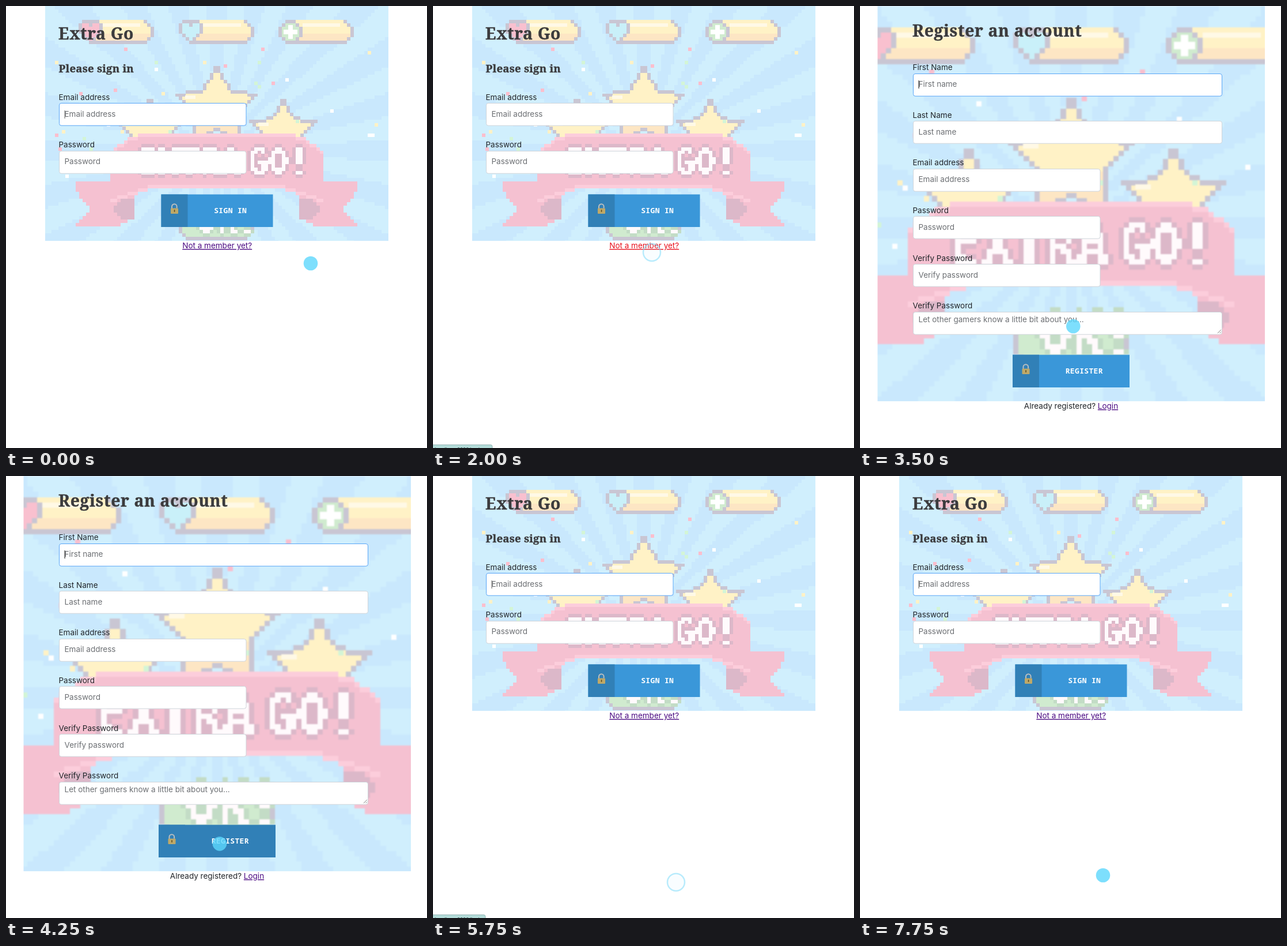
Write an HTML page that moves like this. It is 731 px wide and 766 px high and loops after 8000 ms.

```html
<!DOCTYPE html>
<html lang="en">
<head>
<meta charset="utf-8">
<title>Sign in and register</title>
<style>
  html, body { margin: 0; width: 100%; height: 100%; overflow: hidden; background: #fff; }
  #stage { display: block; width: 100vw; height: 100vh; }
  text { font: 13.5px Inter, "Open Sans", sans-serif; fill: #212529; }
  .title, .sub { font: 700 28.3px "Noto Serif", serif; letter-spacing: .65px; fill: #3b3b3d; stroke: #3b3b3d; stroke-width: .4; }
  .sub { font-size: 18.7px; letter-spacing: .2px; }
  .hint { fill: #6c6f73; }
  .link { fill: #4b0a82; text-decoration: underline; }
  .action { font: 700 13px "Noto Sans Mono", monospace; letter-spacing: .35px; fill: #fff; }
  .status { font: 9px Roboto, sans-serif; fill: #2d4a4a; }
  .art { shape-rendering: crispEdges; }
  .soft { filter: blur(.13px); }
</style>
</head>
<body>
<svg id="stage" viewBox="0 0 731 766">
  <defs><g id="art" class="art"></g></defs>
  <g id="signin"></g>
  <g id="register"></g>
  <g id="status">
    <rect x="-5" y="760.5" width="108" height="12" rx="3" fill="#b4dcd9" stroke="#93b5b4"/>
    <text class="status" x="3" y="772"></text>
  </g>
  <circle id="ring" r="15" fill="#7fdcfa" fill-opacity=".08" stroke="#7fdcfa" stroke-width="2.5"/>
  <circle id="dot" r="12.3" fill="#5cd7fc" opacity=".8"/>
</svg>
<script>
const $ = id => document.getElementById(id);

function add(parent, tag, attrs, text) {
  const el = document.createElementNS('http://www.w3.org/2000/svg', tag);
  for (const k in attrs) el.setAttribute(k, attrs[k]);
  if (text) el.textContent = text;
  parent.appendChild(el);
  return el;
}
const box = (p, x, y, width, height, fill, more) => add(p, 'rect', { x, y, width, height, fill, ...more });

// ---- pixel art: 100 x 75 cells, x = 0 in the middle ----
const W = 100, H = 75;
const GREY = '#c9c6d3', YELLOW = '#fff2c6', PEACH = '#fde6c4', CREAM = '#fff9e6',
      PINK = '#f5c1d1', ROSE = '#fccddb', SHADE = '#dcb8c9', GREEN = '#d0ebcf', WHITE = '#fffafc';
const art = $('art');
const { abs, cos, sin, min, max, floor, hypot, PI } = Math;

// Fills every cell whose middle passes the test, in row runs.
function fill(parent, color, test) {
  let d = '';
  for (let y = 0; y < H; y++) {
    for (let x = -W / 2; x < W / 2; x++) {
      const from = x;
      while (x < W / 2 && test(x + .5, y + .5)) x++;
      if (x > from) d += `M${from} ${y}h${x - from}v1h${from - x}z`;
    }
  }
  add(parent, 'path', { d, fill: color });
}
const core = test => (x, y) => test(x, y) &&
  test(x - 1, y) && test(x + 1, y) && test(x, y - 1) && test(x, y + 1);
const at = (x, y) => add(art, 'g', { transform: `translate(${x} ${y})` });

function outlined(parent, test, color) {
  fill(parent, GREY, test);
  fill(parent, color, core(test));
}

function rays() {
  box(art, -W / 2, 0, W, H, '#d0effd');
  fill(art, '#c9e8fd', (x, y) => cos(24 * Math.atan2(x, y - 42)) > 0);
}

const heart = (x, y) => {
  const side = abs(x - 3.5);
  return side < min(3.6, 7.2 - y) && y > max(0, abs(side - 1.75) - .6);
};
const disc = (x, y) => hypot(x - 3.5, y - 3.5) < 3.4;

function bar(x, icon, color) {
  const g = at(x, 4);
  const tube = (a, b) => b < 7 && a > 3 && a < 22 - max(0, abs(b - 3.5) - 1);
  outlined(g, tube, PEACH);
  fill(g, YELLOW, (a, b) => b < 4 && core(tube)(a, b));
  box(g, 7, 1, 11, 1, CREAM);
  outlined(g, icon, color);
  return g;
}

function star(x, y, R) {
  const g = at(x, y);
  // Angle from the nearest tip, then the straight edge from tip to notch.
  const test = (a, b) => {
    const dy = R - b, turn = 2 * PI / 5;
    const ang = Math.atan2(a, dy), off = abs(ang - turn * Math.round(ang / turn));
    const notch = .54 * R, nx = notch * cos(PI / 5), ny = notch * sin(PI / 5);
    const r = hypot(a, dy);
    return r * cos(off) + r * sin(off) * (R - nx) / ny < R + .8;
  };
  outlined(g, test, YELLOW);
  fill(g, PEACH, (a, b) => b > 1.15 * R && core(test)(a, b));
  box(g, -.75 * R, .7 * R, 3, 1, CREAM);
}

function seeded(seed) {
  return () => (seed = seed * 16807 % 2147483647) / 2147483647;
}
function confetti() {
  const rnd = seeded(77), colors = [YELLOW, '#fbbecd', '#fff', '#d3f5d6'];
  for (let i = 0; i < 44; i++)
    box(art, floor(rnd() * 94) - 47, 12 + floor(rnd() * 38), 1, 1, colors[i % colors.length]);
}

// The ribbon is symmetric, so it is described by the distance from the middle.
function banner() {
  const main = (x, y) => {
    const a = abs(x);
    return a < 31.2 && y > 37 + 5 * max(0, (a - 19) / 12) ** 2 && y < 53 + .33 * max(0, a - 18);
  };
  const tail = (x, y) => {
    const a = abs(x);
    return a > 24 && a < min(41.5, 36.5 + .9 * abs(y - 58.9)) &&
      y > 51.2 && y < 64.5 - .5 * max(0, 30 - a);
  };
  const fold = (x, y) => abs(x) > 24 && abs(y - 58.7) < min(2.9, .9 * (30.7 - abs(x)));
  fill(art, PINK, tail);
  fill(art, ROSE, main);
  fill(art, PINK, (x, y) => main(x, y) && main(x, y - 1) && main(x, y + 1));
  fill(art, SHADE, fold);
}

// Sets a word in a small canvas and turns its dark spots into cells.
function word(str, x, base, shade) {
  const c = document.createElement('canvas');
  c.width = W;
  c.height = H;
  const pen = c.getContext('2d');
  pen.font = 'bold 10px "DejaVu Sans Mono", monospace';
  pen.fillText(str, x + W / 2, base);
  const px = pen.getImageData(0, 0, W, H).data;
  const lit = (a, b) => px[(floor(b) * W + floor(a) + W / 2) * 4 + 3] > 120;
  const near = (a, b) => lit(a, b) || lit(a - 1, b) || lit(a + 1, b) || lit(a, b - 1) || lit(a, b + 1);
  fill(art, shade, near);
  fill(art, WHITE, lit);
}

function okButton() {
  outlined(art, (x, y) => abs(x) < 11 - max(0, abs(y - 63) - 3) && abs(y - 63) < 4.6, GREEN);
  word('OK!', -6, 66, '#c3dcc6');
}

function drawArt() {
  rays();
  bar(-40.2, heart, '#f9c0cf');
  bar(-11, heart, '#c9f0f9');
  const health = bar(18, disc, GREEN);
  box(health, 1.5, 2.8, 4, 1.4, '#fff');
  box(health, 2.8, 1.5, 1.4, 4, '#fff');
  for (const side of [-1, 1]) star(19.4 * side, 27, 9.7);
  star(0, 17.4, 12.2);
  confetti();
  banner();
  word('EXTRA', -23, 49, SHADE);
  word('GO!', 9, 49, SHADE);
  okButton();
}

// ---- pages ----
function backdrop(p, x, width, height, cell) {
  const w = width / cell;
  const s = add(p, 'svg', { x, y: 0, width, height, viewBox: `${-w / 2} 0 ${w} ${height / cell}` });
  add(s, 'use', { href: '#art', class: 'soft' });
}

const WIDE = 536, NARROW = 324.5;
function field(p, y, width, label, hint = label, hintY = y + 23.5) {
  add(p, 'text', { x: 91.5, y: y - 5.5 }, label);
  const frame = box(p, 92.5, Math.round(y) + .5, width, 38.7, '#fff', { rx: 3.5, stroke: '#ced4da' });
  add(p, 'text', { x: 101.5, y: hintY, class: 'hint' }, hint);
  return frame;
}
const focus = (frame, on) => frame.setAttribute('stroke', on ? '#58a6f7' : '#ced4da');

function button(p, x, y, width, label) {
  const face = box(p, x, y, width, 56.5, '#3a97d9');
  box(p, x, y, 46, 56.5, '#3180b7');
  add(p, 'path', { d: `M${x + 18.5} ${y + 26}v-5a4.3 4.3 0 0 1 8.6 0v3`, fill: 'none', stroke: '#b9bec0', 'stroke-width': 2 });
  box(p, x + 16.5, y + 24, 13, 9.5, '#bfa968', { rx: 1 });
  box(p, x + 22.3, y + 26.5, 1.5, 4, '#5f4c1f');
  add(p, 'text', { x: x + 91.7, y: y + 32.5, class: 'action' }, label);
  return face;
}

drawArt();

const signin = $('signin'), register = $('register');
backdrop(signin, 67.5, 596.5, 407, 5.965);
add(signin, 'text', { x: 91, y: 58, class: 'title' }, 'Extra Go');
add(signin, 'text', { x: 91.5, y: 115, class: 'sub' }, 'Please sign in');
const email = field(signin, 168.2, NARROW, 'Email address');
field(signin, 250.8, NARROW, 'Password');
const emailCaret = box(signin, 101.5, 181, 1.2, 14, '#777');
button(signin, 269.5, 326.5, 194, 'SIGN IN');
const joinLink = add(signin, 'text', { x: 366.7, y: 420, 'text-anchor': 'middle', class: 'link' }, 'Not a member yet?');

backdrop(register, 30.5, 672.5, 685, 9.15);
add(register, 'text', { x: 91, y: 53, class: 'title' }, 'Register an account');
const rowY = i => 116.6 + 82.6 * i;
const firstName = field(register, rowY(0), WIDE, 'First Name', 'First name');
focus(firstName, true);
field(register, rowY(1), WIDE, 'Last Name', 'Last name');
field(register, rowY(2), NARROW, 'Email address');
field(register, rowY(3), NARROW, 'Password');
field(register, rowY(4), NARROW, 'Verify Password', 'Verify password');
field(register, rowY(5), WIDE, 'Verify Password', 'Let other gamers know a little bit about you...', 547.5);
add(register, 'path', { d: 'M621 567l6-6m-2.5 6l2.5-2.5', stroke: '#777', 'stroke-width': .9 });
const nameCaret = box(register, 101.5, 129, 1.2, 14, '#333');
const registerFace = button(register, 265, 604.5, 203, 'REGISTER');
const footer = add(register, 'text', { x: 366.5, y: 698, 'text-anchor': 'middle' }, 'Already registered? ');
add(footer, 'tspan', { class: 'link' }, 'Login');

// ---- timeline ----
const LOOP = 8000, STEP = 250, JOIN = 2000, OPEN = 2250, BACK = 5750;
const TRAVEL = 1250;
const start = { x: 529, y: 446 };
const moves = [
  { from: 250, x: 380, y: 415 },
  { from: 2750, x: 365, y: 631 },
  { from: 4000, x: 422, y: 692 }
];

const ease = p => p * p * (3 - 2 * p);
function pointer(t) {
  let { x, y } = start;
  for (const m of moves) {
    const e = ease(min(1, max(0, (t - m.from) / TRAVEL)));
    x += (m.x - x) * e;
    y += (m.y - y) * e;
  }
  return [x, y];
}
const show = (el, on) => el.setAttribute('visibility', on ? 'inherit' : 'hidden');
const within = (t, a, b) => t >= a && t < b;
const blink = since => floor(since / 500) % 2 === 0;

function render(time) {
  const t = floor(time % LOOP / STEP) * STEP;
  const second = within(t, OPEN, BACK), pressed = t === JOIN;
  show(signin, !second);
  show(register, second);

  focus(email, !pressed);
  show(emailCaret, !second && !pressed && blink(t < OPEN ? t : t - BACK));
  show(nameCaret, second && blink(t - OPEN));
  joinLink.style.fill = pressed ? '#e8101c' : '';

  const [x, y] = pointer(t);
  const hover = second && within(x, 265, 468) && within(y, 604, 661);
  registerFace.setAttribute('fill', hover ? '#3180b7' : '#3a97d9');

  const click = [JOIN, BACK].find(c => within(t, c, c + 500));
  show($('dot'), click === undefined);
  show($('ring'), click !== undefined);
  for (const [id, drop] of [['dot', 0], ['ring', 12]]) {
    $(id).setAttribute('cx', x);
    $(id).setAttribute('cy', y + drop);
  }
  $('ring').setAttribute('opacity', t === click ? .55 : .4);

  const joining = within(t, 1750, 2750);
  const [tip, tipText] = $('status').children;
  show($('status'), joining || within(t, 5000, 6250));
  tip.setAttribute('width', joining ? 108 : 96);
  tipText.textContent = 'localhost:3000/' + (joining ? 'register' : 'login');
}

const began = performance.now();
function tick() {
  render(performance.now() - began);
  requestAnimationFrame(tick);
}
tick();
</script>
</body>
</html>
```
